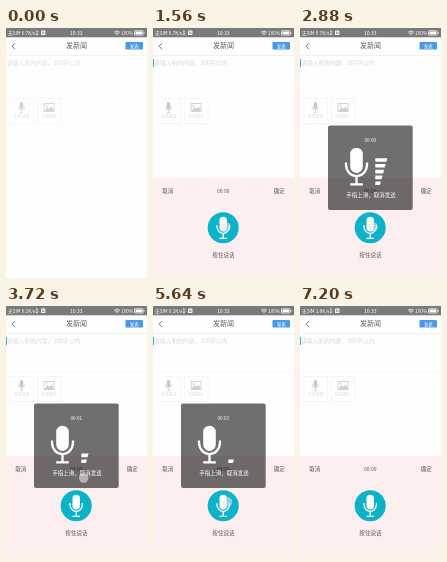
An HTML page for the animation above (8000 ms loop, 141 px wide and 250 px high).

```html
<!DOCTYPE html>
<html>
<head>
<meta charset="utf-8">
<title>Voice note</title>
<style>
  html, body { margin: 0; width: 100%; height: 100%; overflow: hidden; background: #fff; }
  svg { display: block; width: 100vw; height: 100vh; }
  text { font-family: "Noto Sans CJK SC", "Noto Sans CJK", "Noto Sans", sans-serif; fill: #5c5c5c; }
  .mid { text-anchor: middle; }
  .light { fill: #fff; }
  .pale { fill: #d9d9d9; }
</style>
</head>
<body>
<svg viewBox="0 0 141 250" preserveAspectRatio="none">
  <defs>
    <!-- 22 x 36 microphone, centred on the origin -->
    <g id="mic">
      <rect x="-6" y="-18" width="12" height="24" rx="6" fill="currentColor"/>
      <path d="M-10-4v2a10 11 0 0 0 20 0v-2M0 9v7M-6 17H6" fill="none" stroke="currentColor" stroke-width="2.2"/>
    </g>
  </defs>

  <rect width="141" height="250" fill="#fefefe"/>
  <g id="page">
    <path d="M0 27.5H141" stroke="#ececec" stroke-width=".7"/>
    <path d="M0 66.5H141" stroke="#f7f7f7" stroke-width=".6"/>
    <text class="pale" x="1" y="37.3" font-size="5.8">请输入新的内容，300字以内</text>
    <g fill="#fff" stroke="#f3f3f3" stroke-width=".7">
      <rect x="4" y="70.5" width="23.5" height="25"/>
      <rect x="31.5" y="70.5" width="23.5" height="25"/>
    </g>
    <use href="#mic" transform="translate(15.5 79.5) scale(.3)" color="#c8c8c8"/>
    <g fill="none" stroke="#cfcfcf" stroke-width=".9">
      <rect x="38" y="75.5" width="10" height="8"/>
      <path d="M38.5 83l3-4 2 2 2-2.5 2.5 4.5z" fill="#cfcfcf" stroke="none"/>
      <circle cx="40.6" cy="77.8" r=".6"/>
    </g>
    <g class="mid" font-size="4">
      <text class="pale" x="15.7" y="90.3">在线录音</text>
      <text class="pale" x="43" y="90.3">在线图片</text>
    </g>
  </g>
  <rect id="caret" y="31" width="1" height="8" fill="#28b8c8"/>

  <text class="mid" x="70.5" y="20.4" font-size="7">发新闻</text>
  <path d="M9 15.2L6 18.2l3 3" fill="none" stroke="#666" stroke-width=".9"/>
  <rect x="119.5" y="14" width="17.5" height="7.6" rx="1.2" fill="#4a98e8"/>
  <text class="mid light" x="128.3" y="19.5" font-size="4.6">发表</text>

  <rect width="141" height="9.3" fill="#7a7a7a"/>
  <text class="light" id="speed" x="2" y="6.5" font-size="4.7"></text>
  <path d="M31 2.5v5M29.8 3.7L31 2.5l1.2 1.2M29.8 5.5L31 7l1.2-1.8" fill="none" stroke="#fff" stroke-width=".6"/>
  <rect x="35" y="2.5" width="4.4" height="4.6" rx=".7" fill="#fff"/>
  <path d="M36.3 6.2V3.5l1.8 2.6V3.4" fill="none" stroke="#777" stroke-width=".6"/>
  <text class="mid light" x="70.3" y="6.6" font-size="5.1">10:33</text>
  <g fill="none" stroke="#fff" stroke-width=".8">
    <path d="M108 4.3q3-2.6 6 0M109.2 5.6q1.8-1.5 3.6 0"/>
    <path d="M110.4 6.7h1.2"/>
    <rect x="128.5" y="2.8" width="8.6" height="4.2" rx=".6"/>
    <path d="M129.5 4.9h6.6" stroke-width="2.6"/>
    <path d="M138 4v1.8"/>
  </g>
  <text class="light" x="115" y="6.5" font-size="4.8">100%</text>

  <g id="panel">
    <rect y="150" width="141" height="100" fill="#fdeef0"/>
    <text x="9.3" y="164.7" font-size="5.5">取消</text>
    <text class="mid" x="70.3" y="164.7" font-size="5">00:00</text>
    <text x="120.7" y="164.7" font-size="5.5">确定</text>
    <circle cx="70.2" cy="199.8" r="15.5" fill="#0bb2c8"/>
    <use href="#mic" transform="translate(70.2 199.8) scale(.62)" color="#fff"/>
    <text class="mid" x="70.5" y="228.8" font-size="5.6">按住说话</text>
  </g>

  <g id="dialog">
    <rect x="28" y="97.5" width="84.7" height="84.5" rx="2" fill="#000" fill-opacity=".56"/>
    <text class="mid light" id="timer" x="70.3" y="114" font-size="4.6"></text>
    <g id="record">
      <use href="#mic" transform="translate(56.5 138.6) scale(1.05)" color="#fff"/>
      <g id="bars" fill="#fff"></g>
    </g>
    <path id="back" d="M78.6 157.5V129a8.2 8.2 0 0 0-16.4 0v11" fill="none" stroke="#fff" stroke-width="5.4"/>
    <path id="head" d="M53 137.5h18.4L62.2 149.5z" fill="#fff"/>
    <text class="mid light" id="hint" x="71" y="169.2" font-size="5.5"></text>
  </g>
  <circle id="touch" r="4.8" fill="#e4e4e4" fill-opacity=".6"/>
</svg>
<script>
const LOOP = 8000, STEP = 120;
const $ = id => document.getElementById(id);
const show = (id, on) => $(id).setAttribute('visibility', on ? 'inherit' : 'hidden');
const during = (t, from, to) => t >= from && t < to;

// [time, value...] rows, linear in between
function track(rows, t) {
  const next = rows.findIndex(row => row[0] > t);
  if (next < 0) return rows[rows.length - 1].slice(1);
  if (next === 0) return rows[0].slice(1);
  const a = rows[next - 1], b = rows[next];
  const p = (t - a[0]) / (b[0] - a[0]);
  return a.slice(1).map((v, i) => v + (b[i + 1] - v) * p);
}

const finger = [
  [3360, 73, 199], [3600, 75, 187], [3960, 83, 142], [4200, 85, 126],
  [4560, 85, 126], [4920, 83, 155], [5160, 79, 183],
  [5400, 75, 196], [5880, 74, 196], [6600, 71, 200]
];
const popup = [ // opacity, scale
  [2400, 0, .8], [2520, .8, .9], [2640, 1, 1],
  [6480, 1, 1], [6600, .55, .84], [6720, .2, .81], [6840, 0, .8]
];
const levels = '1245312431231';

const bars = Array.from({ length: 5 }, (_, i) => {
  const bar = document.createElementNS('http://www.w3.org/2000/svg', 'path');
  const y = 157 - i * 5.8, w = 4.6 + i * 1.6;
  bar.setAttribute('d', `M75.3 ${y}h${w}l1-3.6h${-w - 1}z`);
  return $('bars').appendChild(bar);
});

function render(t) {
  show('caret', t >= 240);
  $('page').setAttribute('opacity', t < 960 ? .85 : 1);
  $('speed').textContent = `无SIM ${t < 3120 ? '0.7' : t < 6360 ? '0.2' : '1.8'}K/s`;

  const slide = Math.min(1, Math.max(0, (t - 1320) / 240));
  show('panel', t >= 1320);
  $('panel').setAttribute('transform', `translate(0 ${21 * (1 - slide) ** 2})`);

  const [alpha, scale] = track(popup, t);
  show('dialog', alpha > 0);
  $('dialog').setAttribute('opacity', alpha);
  $('dialog').setAttribute('transform', `translate(70.5 139.5) scale(${scale}) translate(-70.5 -139.5)`);

  const cancel = during(t, 3840, 5160);
  show('record', !cancel);
  show('back', cancel);
  show('head', cancel);
  $('hint').textContent = cancel ? '松开手指，取消发送' : '手指上滑，取消发送';
  $('timer').textContent = '00:0' + Math.max(0, Math.floor((t - 2300) / 1000));

  const tick = Math.max(0, Math.round((t - 2520) / STEP));
  const level = +levels[tick % levels.length];
  bars.forEach((bar, i) => bar.setAttribute('visibility', i < level ? 'inherit' : 'hidden'));

  const tap = during(t, 600, 960);
  const [x, y] = tap ? [16.5, 82.5] : track(finger, t);
  show('touch', tap || during(t, 1560, 7200));
  $('touch').setAttribute('cx', x);
  $('touch').setAttribute('cy', y);
}

const start = performance.now();
function frame() {
  const t = (performance.now() - start) % LOOP;
  render(Math.floor(t / STEP) * STEP);
  requestAnimationFrame(frame);
}
frame();
</script>
</body>
</html>
```
